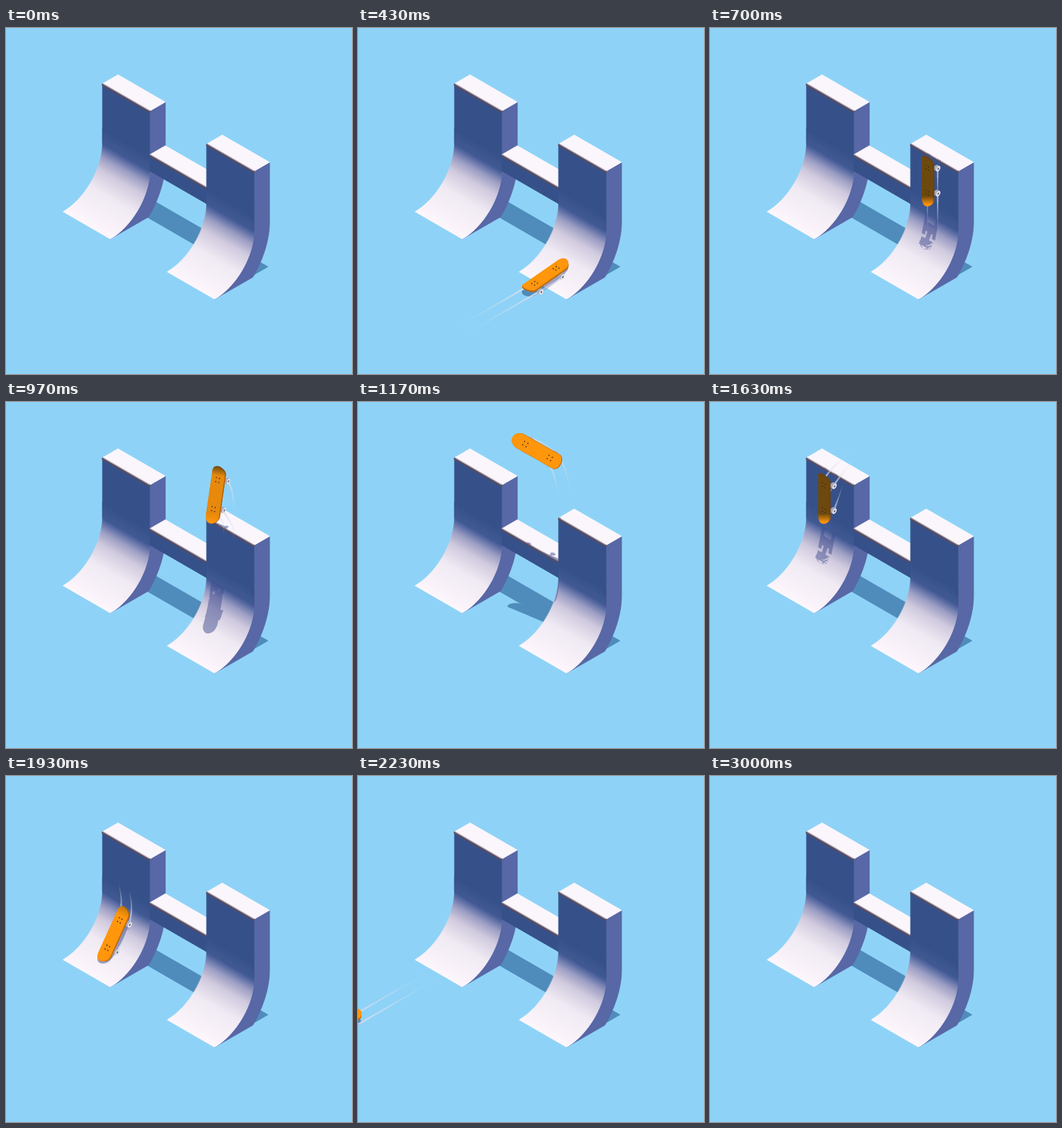
These frames come from a looping animation (500x500 px, 3030 ms). An HTML page with a canvas:

```html
<!DOCTYPE html>
<html lang="en">
<head>
<meta charset="utf-8">
<title>Half-pipe</title>
<style>
html, body { margin: 0; width: 100%; height: 100%; overflow: hidden; background: #8ed3f7; }
canvas { display: block; }
</style>
</head>
<body>
<canvas id="stage" width="500" height="500"></canvas>
<script>
const LOOP = 3030, TRAIL = 155;
// ramp radius, tower depth, tower width, gap offset, tower height, bar top and bottom
const R = 66, DEPTH = 92, W = 79, OFF = 174, TOP = 152, BAR = 89, BARLOW = 65;
const LIFT = 10, RC = R - LIFT, ARC = RC * Math.PI / 2;
const LANE_A = 39, LANE_B = 212, LEAN = 0.03;
const FACE = [54, 81, 138], BEND = [66, 90, 147];
const SIDE = '#5867a5', WHITE = '#fbf6fc', SHADE = '#4f8cbb';

const ctx = document.getElementById('stage').getContext('2d');
const clamp = (x, a, b) => Math.min(b, Math.max(a, x));
const mix = (a, b, k) => a.map((x, i) => x + (b[i] - x) * k);
const rgb = c => `rgb(${c.map(Math.round).join(',')})`;
const dot = (a, b) => a[0] * b[0] + a[1] * b[1] + a[2] * b[2];
const unit = a => { const l = Math.hypot(...a); return a.map(x => x / l); };
const cross = (a, b) => [a[1] * b[2] - a[2] * b[1], a[2] * b[0] - a[0] * b[2], a[0] * b[1] - a[1] * b[0]];
const EYE = unit([-1, 1, 1]);

// isometric projection: u runs back, v runs right, z runs up
const iso = ([u, v, z]) => [82.2 + 0.866 * (u + v), 265.5 - 0.5 * u + 0.5 * v - z];

function trace(g, pts) {
  pts.forEach((p, i) => i ? g.lineTo(p[0], p[1]) : g.moveTo(p[0], p[1]));
  g.closePath();
}
function poly(g, pts, fill, edge = 0) {
  g.beginPath();
  trace(g, pts.map(iso));
  g.fillStyle = g.strokeStyle = fill;
  g.fill();
  if (edge) {
    g.lineWidth = edge;
    g.stroke();
  }
}
function line(g, a, b, color, width) {
  const p = iso(a), q = iso(b);
  g.beginPath();
  g.moveTo(p[0], p[1]);
  g.lineTo(q[0], q[1]);
  g.strokeStyle = color;
  g.lineWidth = width;
  g.lineCap = 'round';
  g.stroke();
}

// ---- ramp ----
const arc = (r, a) => [r * Math.sin(a), R - r * Math.cos(a)];
const flat = (u0, u1, v0, v1, z) => [[u0, v0, z], [u1, v0, z], [u1, v1, z], [u0, v1, z]];
const wall = (u, v0, v1, z0, z1) => [[u, v0, z0], [u, v1, z0], [u, v1, z1], [u, v0, z1]];

function rampColor(k) {
  const stops = [[0, 253, 246, 252], [0.45, 240, 234, 244], [0.68, 208, 202, 222],
    [0.83, 155, 157, 195], [0.95, 88, 106, 162], [1, ...BEND]];
  let i = 1;
  while (k > stops[i][0] && i < stops.length - 1) i++;
  const a = stops[i - 1], b = stops[i];
  return rgb(mix(a, b, (k - a[0]) / (b[0] - a[0])).slice(1));
}

function coping(g, v0, v1, z) {
  line(g, [R, v0 + 1, z - 1], [R, v1 - 1, z - 1], '#574d60', 3.6);
  line(g, [R, v0 + 1, z + 0.4], [R, v1 - 1, z + 0.4], '#c9bdc6', 1.2);
}

function tower(g, v) {
  const w = v + W, end = Math.acos(R / DEPTH), side = [];
  for (let i = 0; i <= 24; i++) {
    const [u, z] = arc(R, i / 24 * Math.PI / 2);
    side.push([u, w, z]);
  }
  side.push([R, w, TOP], [DEPTH, w, TOP]);
  for (let i = 24; i >= 0; i--) {
    const [u, z] = arc(DEPTH, end + (Math.PI / 2 - end) * i / 24);
    side.push([u, w, z]);
  }
  poly(g, side, SIDE, 0.7);
  const n = 60;
  for (let i = 0; i < n; i++) {
    const [u, z] = arc(R, i / n * Math.PI / 2);
    const [u2, z2] = arc(R, Math.min(1, (i + 1.6) / n) * Math.PI / 2);
    poly(g, [[u, v, z], [u, w, z], [u2, w, z2], [u2, v, z2]], rampColor(i / (n - 1)), 0.4);
  }
  poly(g, wall(R, v, w, R, TOP), rgb(FACE), 0.7);
  for (let z = 0; z < 22; z++)
    poly(g, wall(R, v, w, R + z, R + z + 1.5), rgb(mix(BEND, FACE, z / 22)), 0.4);
  poly(g, flat(R, DEPTH, v, w, TOP), WHITE, 0.7);
  coping(g, v, w, TOP);
}

const layer = document.createElement('canvas');
layer.width = layer.height = 500;
{
  const g = layer.getContext('2d');
  tower(g, 0);
  poly(g, wall(R, W, OFF, BARLOW, BAR), rgb(FACE));
  poly(g, flat(R, DEPTH, W, OFF, BAR), WHITE, 0.7);
  coping(g, W, OFF, BAR);
  tower(g, OFF);
}

// ---- motion ----
function hermite(t, t0, p0, m0, t1, p1, m1) {
  const d = t1 - t0, k = (t - t0) / d, q = k * k, c = q * k;
  return (2 * c - 3 * q + 1) * p0 + (c - 2 * q + k) * d * m0 + (3 * q - 2 * c) * p1 + (c - q) * d * m1;
}
function distUp(t) {
  return t < 430 ? 5 + 0.8 * (t - 430) : hermite(t, 430, 5, 0.75, 970, ARC + 138, 0.31);
}
function distDown(t) {
  return t > 2130 ? -69 - 0.97 * (t - 2130) : hermite(t, 1630, ARC + 53, -0.36, 2130, -69, -0.92);
}
// row: centre, heading, deck normal
function ride(s, v, dir) {
  const a = clamp(s / RC, 0, Math.PI / 2), c = Math.cos(a), n = Math.sin(a);
  const u = s < 0 ? s : RC * n;
  const z = R - RC * c + Math.max(0, s - ARC);
  return [u, v, z, dir * c, 0, dir * n, -n, 0, c];
}
const up = t => ride(distUp(t), LANE_B, 1);
const down = t => ride(distDown(t), LANE_A, -1);

const air = [
  [780, ...up(780)],
  [880, ...up(880)],
  [970, 54, 201, 205, 0.33, -0.13, 0.93, -0.85, 0.12, 0.34],
  [1170, 58, 147, 239, -0.15, -0.95, 0.15, -0.75, 0.1, 0.65],
  [1370, 61, 87, 210, -0.53, -0.35, -0.77, -0.45, -0.62, 0.6],
  [1630, ...down(1630)],
  [1730, ...down(1730)]
];
function flight(t) {
  let i = 1;
  while (t > air[i + 1][0]) i++;
  const [a, b, c, d] = air.slice(i - 1, i + 3);
  return b.map((p, j) => hermite(t, b[0], p, (c[j] - a[j]) / (c[0] - a[0]),
    c[0], c[j], (d[j] - b[j]) / (d[0] - b[0]))).slice(1);
}
function pose(t) {
  const row = t < 880 ? up(t) : t < 1630 ? flight(t) : down(t);
  const f = unit(row.slice(3, 6)), m = row.slice(6), k = dot(f, m);
  const n = unit(m.map((x, i) => x - k * f[i]));
  return { p: row.slice(0, 3), f, n, r: cross(f, n) };
}
// board space to world: a along, b across, c above the deck
const at = (o, a, b, c) => o.p.map((x, i) => x + a * o.f[i] + b * o.r[i] + c * o.n[i]);

// ---- board ----
const HALF = 35, BW = 9.2, AXLE = 18, TRACK = 8.5, DROP = -7.5, WHEEL = 3.5;
const kick = a => 4 * Math.pow(Math.max(0, Math.abs(a) - 24) / 11, 2);

function deck(o, c) {
  const pts = [];
  for (let i = 0; i < 48; i++) {
    const q = i / 48 * Math.PI * 2, s = Math.cos(q) < 0 ? -1 : 1;
    const a = s * (HALF - BW) + BW * Math.cos(q);
    pts.push(at(o, a, BW * Math.sin(q), c + kick(a)));
  }
  // fill the straight sides so the outline bends on curved ground
  return pts.flatMap((p, i) => {
    const q = pts[(i + 1) % 48];
    if (Math.hypot(p[0] - q[0], p[1] - q[1], p[2] - q[2]) < 10) return [p];
    return Array.from({ length: 12 }, (_, j) => mix(p, q, j / 12));
  });
}
function disc(o, a, b, r) {
  return Array.from({ length: 16 }, (_, i) => {
    const q = i / 8 * Math.PI;
    return at(o, a + r * Math.cos(q), b, DROP + r * Math.sin(q));
  });
}

function wheels(o) {
  const side = dot(o.r, EYE) > 0 ? 1 : -1;
  for (const a of [-AXLE, AXLE]) {
    line(ctx, at(o, a, 0, -2), at(o, a, 0, DROP), '#7d8096', 4);
    line(ctx, at(o, a, -TRACK, DROP), at(o, a, TRACK, DROP), '#9a9db2', 2);
  }
  for (const s of [-side, side]) for (const a of [-AXLE, AXLE]) {
    const b = s * TRACK;
    for (let k = -1.8; k <= 1.8; k += 0.6) poly(ctx, disc(o, a, b + side * k, WHEEL), '#a9aabd');
    poly(ctx, disc(o, a, b + side * 2, WHEEL), '#e9e5ec');
    poly(ctx, disc(o, a, b + side * 2, 1.4), '#5d607c');
  }
}

// the curled ends catch the light differently from the middle
function deckPaint(o, dim) {
  const paint = ctx.createLinearGradient(...iso(at(o, -HALF, 0, 0)), ...iso(at(o, HALF, 0, 0)));
  const shade = tilt => {
    const lit = clamp(2.4 * (o.n[2] - tilt * o.f[2]), 0, 1);
    return rgb(mix(mix([110, 73, 14], [255, 150, 12], lit), [110, 55, 18], dim));
  };
  [[0, -0.4], [0.17, 0], [0.83, 0], [1, 0.4]].forEach(([k, tilt]) => paint.addColorStop(k, shade(tilt)));
  return paint;
}

function board(o) {
  const facing = dot(o.n, EYE) > 0;
  const top = deckPaint(o, 0), edge = deckPaint(o, 0.45);
  if (facing) wheels(o);
  for (let i = 0; i <= 5; i++) {
    const c = facing ? -2.5 + i * 0.5 : -i * 0.5;
    poly(ctx, deck(o, c), i === 5 ? top : edge);
  }
  if (!facing) return wheels(o);
  ctx.fillStyle = '#4a2c10';
  for (const s of [-AXLE, AXLE]) for (const a of [-2.5, 2.5]) for (const b of [-2.2, 2.2]) {
    const p = iso(at(o, s + a, b, 0.2));
    ctx.beginPath();
    ctx.arc(p[0], p[1], 0.9, 0, 7);
    ctx.fill();
  }
}

function trails(t) {
  const n = 26, past = Array.from({ length: n + 1 }, (_, i) => pose(t - TRAIL * i / n));
  ctx.lineCap = 'butt';
  for (const a of [-AXLE, AXLE]) for (const b of [-TRACK, TRACK]) {
    const pts = past.map(o => iso(at(o, a, b, DROP - 1)));
    for (let i = 0; i < n; i++) {
      const k = 1 - i / n;
      ctx.beginPath();
      ctx.moveTo(...pts[i]);
      ctx.lineTo(...pts[i + 1]);
      ctx.lineWidth = 0.4 + 2.3 * k;
      ctx.strokeStyle = `rgba(216,221,238,${0.8 * k})`;
      ctx.stroke();
    }
  }
}

// ---- shadows fall almost straight down ----
function shadowShapes(o) {
  // a flat and an upright rectangle, so that no pose is left without a shadow
  const slab = (a, b, c, da, db, dc) => [
    [[-da, -db, 0], [da, -db, 0], [da, db, 0], [-da, db, 0]],
    [[0, -db, -dc], [0, db, -dc], [0, db, dc], [0, -db, dc]]
  ].map(q => q.map(p => at(o, a + p[0], b + p[1], c + p[2])));
  const shapes = [deck(o, 0), deck(o, -2.5), ...slab(0, 0, 0, 10, BW, 2.5)];
  for (const a of [-AXLE, AXLE]) {
    shapes.push(...slab(a, 0, DROP, 1.5, TRACK, 1.5), ...slab(a, 0, DROP / 2, 2, 2.5, -DROP / 2));
    for (const b of [-TRACK, TRACK])
      shapes.push(disc(o, a, b, WHEEL), ...slab(a, b, DROP, WHEEL, 2, WHEEL));
  }
  return shapes;
}
function cast(shapes, drop, color, clip) {
  ctx.save();
  if (clip) {
    ctx.beginPath();
    trace(ctx, clip.map(iso));
    ctx.clip();
  }
  ctx.beginPath();
  for (const s of shapes) {
    const pts = s.map(p => iso(drop(p)));
    const area = pts.reduce((sum, p, i) => {
      const q = pts[(i + 1) % pts.length];
      return sum + p[0] * q[1] - q[0] * p[1];
    }, 0);
    trace(ctx, area < 0 ? pts.reverse() : pts);
  }
  ctx.fillStyle = color;
  ctx.fill();
  ctx.restore();
}
const level = h => ([u, v, z]) => [u, v - LEAN * (z - h), h];
function onRamp([u, v, z]) {
  const x = clamp(u, 0, R), h = R - Math.sqrt(R * R - x * x);
  return [u < 0 ? u : x, v - LEAN * (z - h), h];
}
function rampOutline(v) {
  const pts = [];
  for (let i = 0; i <= 20; i++) {
    const [u, z] = arc(R, i / 20 * Math.PI / 2);
    pts.push([u, v, z]);
  }
  return pts.concat(pts.map(p => [p[0], v + W, p[2]]).reverse());
}

function draw(t) {
  ctx.fillStyle = '#8ed3f7';
  ctx.fillRect(0, 0, 500, 500);
  poly(ctx, flat(62, DEPTH, 0, OFF + W - 2, 0), SHADE);
  const live = t < 2450, o = pose(t), shapes = live ? shadowShapes(o) : [];
  if (live) cast(shapes, level(0), SHADE);
  ctx.drawImage(layer, 0, 0);
  if (!live) return;
  const dim = 'rgba(66,78,142,0.5)';
  for (const v of [0, OFF]) {
    cast(shapes, onRamp, dim, rampOutline(v));
    cast(shapes, level(TOP), dim, flat(R, DEPTH, v, v + W, TOP));
  }
  cast(shapes, level(BAR), dim, flat(R, DEPTH, W, OFF, BAR));
  trails(t);
  board(o);
}

const start = performance.now();
function tick() {
  draw((performance.now() - start) % LOOP);
  requestAnimationFrame(tick);
}
tick();
</script>
</body>
</html>
```
